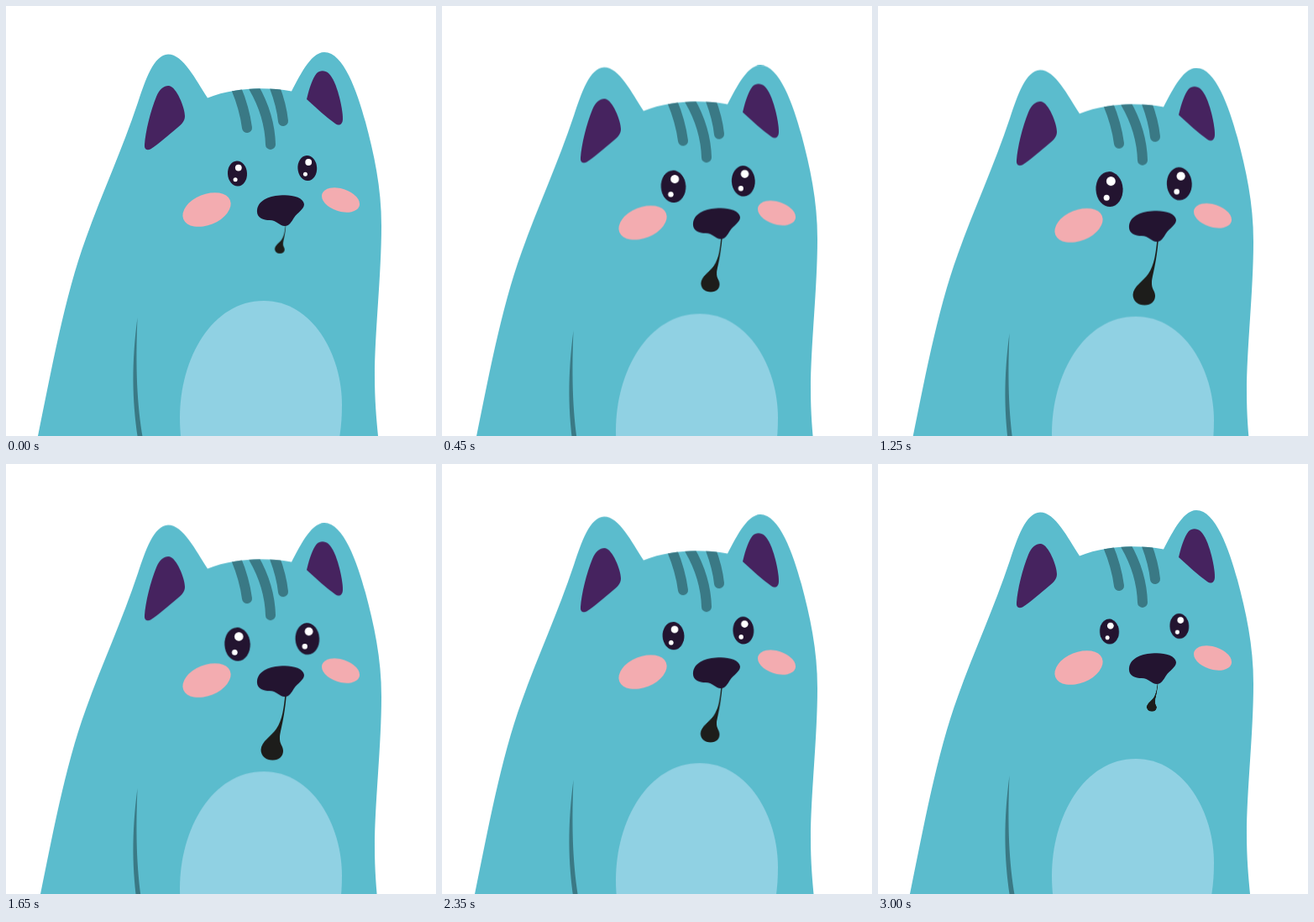
These frames come from a looping animation (512 px wide and 512 px high, 3050 ms). An HTML page:

```html
<!DOCTYPE html>
<html lang="en">
<head>
<meta charset="utf-8">
<title>Surprised cat</title>
<style>
  html, body { margin: 0; width: 100%; height: 100%; overflow: hidden; background: #fff; }
  svg { display: block; width: 100vw; height: 100vh; }

  .cat, .eye, .mouth {
    animation: 3050ms infinite;
    animation-timing-function: cubic-bezier(.333, 0, .667, 1);
  }
  .cat { animation-name: sink; }
  .eye { animation-name: widen; }
  .eye.left { --open: 1.4; transform-origin: 275.5px 199.5px; }
  .eye.right { --open: 1.31; transform-origin: 358.8px 193px; }
  .mouth { animation-name: gape; transform-origin: 333px 261px; }

  @keyframes sink {
    0% { transform: translateY(0); animation-timing-function: cubic-bezier(.33, 0, .3, 1); }
    26.23%, 36.07% { transform: translateY(19px); }
    98.36%, 100% { transform: translateY(0); }
  }
  @keyframes widen {
    0%, 98.36%, 100% { transform: scale(1); }
    22.95%, 38.5% { transform: scale(var(--open)); }
  }
  @keyframes gape {
    0%, 96.72%, 100% { transform: scale(.44); }
    22.95%, 67.21% { transform: scale(1); }
  }

  .fur { fill: #5bbccd; }
  .inner { fill: #46235f; }
  .shade { fill: #3a7985; }
  .stripes { fill: none; stroke: #3a7985; stroke-width: 12; stroke-linecap: round; }
  .belly { fill: #90d1e3; }
  .blush { fill: #f3acb0; }
  .dark { fill: #231430; }
  .shine { fill: #fff; }
  .mouth { fill: #1d1d1b; }
</style>
</head>
<body>
<svg viewBox="0 0 512 512">
  <defs>
    <path id="body" d="M34 532 L38 512 C54 434 70 345 95 277 C115 221 138 172 157 115
      C166 88 176 58 193 57.5 C211 57.5 226 88 240 109.5 C272 97 308 96 340 101.5
      C348 87 362 55 379 55 C402 55 418 102 428 138 C438 176 447 215 447 262
      C447 320 439 390 439 440 C439 470 441 490 443 512 L446 540 Z"/>
    <clipPath id="inside"><use href="#body"/></clipPath>
  </defs>

  <g class="cat">
    <use href="#body" class="fur"/>

    <!-- ears -->
    <path class="inner" d="M165 165 C166 150 172 125 179 108 C183 98 189 94.5 194 95
      C203 96 213 121 213 131 C213 137 209 141 204 145 C192 155 182 164 172 170.5
      C167 172.5 164.5 170 165 165 Z"/>
    <path class="inner" d="M358 111 C361 98 365 86 370 80 C374 76 380 76.5 384 80
      C394 89 401 122 401 134 C401 141 397 143.5 392 140 C381 132 370 122 358 111 Z"/>

    <g class="stripes" clip-path="url(#inside)">
      <path d="M274 98 Q284 122 287 145"/>
      <path d="M295 97 Q314 130 315 165"/>
      <path d="M320 97 Q328 118 330 137"/>
    </g>

    <!-- belly and arm -->
    <path class="belly" d="M207 490 C207 420 245 351 307 351 C365 351 400 415 400 475
      C400 500 397 520 390 545 L213 545 C209 525 207 508 207 490 Z"/>
    <path class="shade" d="M156.5 371 C149.5 425 150 468 157 515 L163 515 C156 475 154 430 156.5 371 Z"/>

    <!-- face -->
    <ellipse class="blush" cx="239" cy="242.5" rx="30" ry="18.3" transform="rotate(-22 239 242.5)"/>
    <ellipse class="blush" cx="398.5" cy="231" rx="23.3" ry="13.5" transform="rotate(18 398.5 231)"/>

    <g class="eye left">
      <ellipse class="dark" cx="275.5" cy="199.5" rx="11.5" ry="15" transform="rotate(-3 275.5 199.5)"/>
      <circle class="shine" cx="276.8" cy="192.6" r="3.9"/>
      <circle class="shine" cx="273.1" cy="206.7" r="2.5"/>
    </g>
    <g class="eye right">
      <ellipse class="dark" cx="358.8" cy="193" rx="11.4" ry="15" transform="rotate(-3 358.8 193)"/>
      <circle class="shine" cx="360.2" cy="186" r="3.9"/>
      <circle class="shine" cx="356.4" cy="200.2" r="2.5"/>
    </g>

    <path class="mouth" d="M332.5 258 C331 275 329 290 322 300 C316 309 304 315 303.5 325
      C303.5 333 310 337.5 317.5 337.5 C325 337.5 330 333 330 326.5
      C330 320 325.5 319 326 310 C326.5 302 331.5 289 334 258 Z"/>
    <path class="dark" d="M299 243 C300 232 312 226.5 326 225.5 C338 224 354 227 355 236
      C355 242 347 246 343 252 C340 257 337 262 332 262 C326 262 322 255 314 255
      C306 255 298 252 299 243 Z"/>
  </g>
</svg>
</body>
</html>
```
